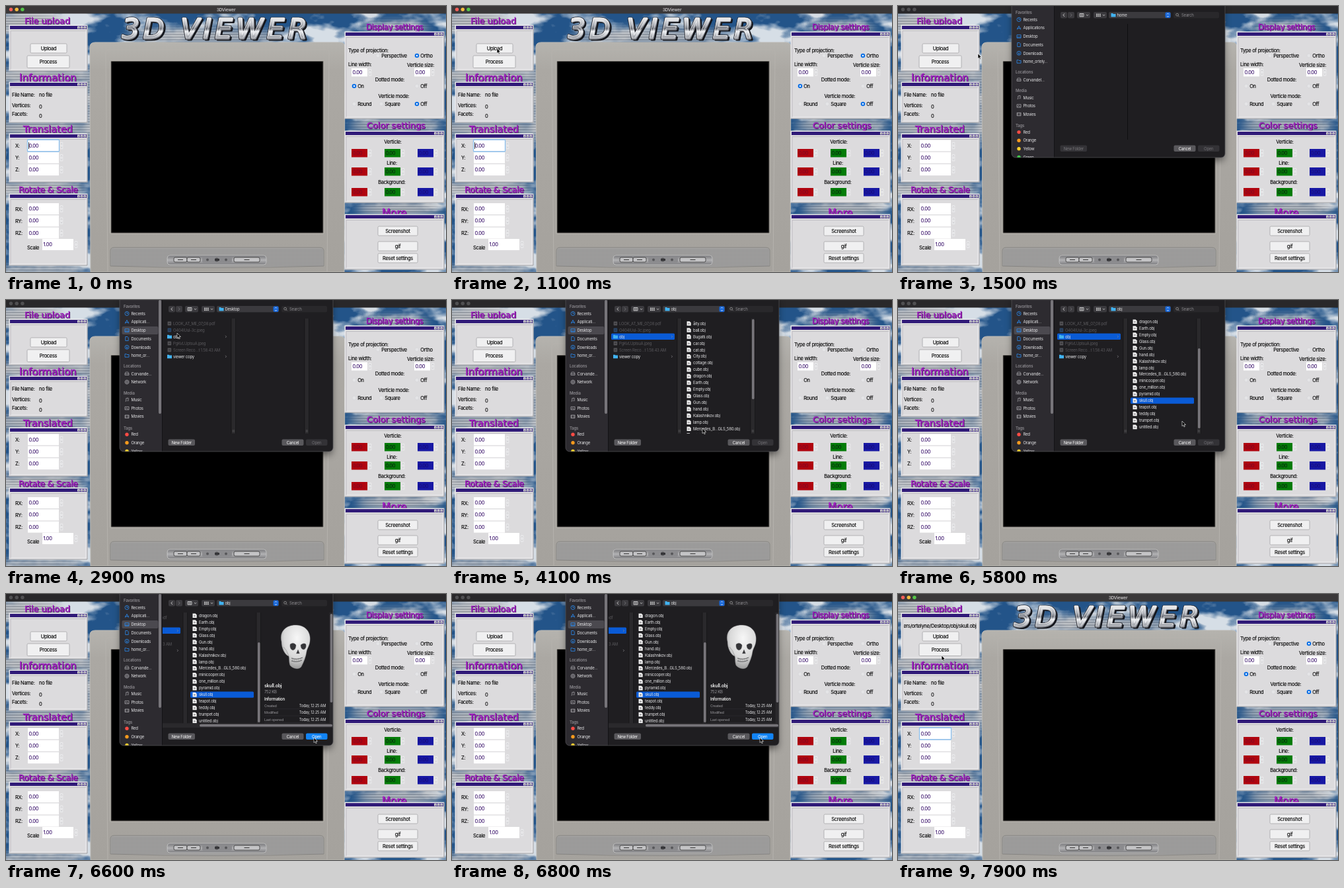
An HTML page that plays this animation: 666x402 px, repeating every 8 s.

```html
<!DOCTYPE html>
<html lang="en">
<head>
<meta charset="utf-8">
<title>3DViewer</title>
<style>
html, body { margin: 0; width: 100%; height: 100%; overflow: hidden; background: #222; }
svg { position: absolute; left: 0; top: 0; width: 666px; height: 402px; }
#back { will-change: transform; }
text { font-family: Inter, "Liberation Sans", sans-serif; white-space: pre; }
.ui { font-size: 7.5px; letter-spacing: -.3px; fill: #000; stroke: #000; stroke-width: .12px; }
.fd { font-size: 6px; letter-spacing: -.23px; fill: #e4e4e6; }
.head { font-family: "DejaVu Sans", sans-serif; fill: #b01fce; stroke: #8a18ae; stroke-width: .4px; }
.logo { font: oblique 41px "DejaVu Sans", sans-serif; letter-spacing: 6px; stroke-linejoin: round; }
</style>
</head>
<body>
<svg id="back" viewBox="0 0 666 402" xmlns="http://www.w3.org/2000/svg">
<defs>
  <filter id="soft" x="-50%" y="-50%" width="200%" height="200%"><feGaussianBlur stdDeviation="7"/></filter>
  <filter id="cloud" x="0" y="0" width="100%" height="100%" color-interpolation-filters="sRGB">
    <feTurbulence type="fractalNoise" baseFrequency=".016 .03" numOctaves="4" seed="8"/>
    <feColorMatrix values="0 0 0 0 .84  0 0 0 0 .87  0 0 0 0 .9  4.5 0 0 0 -1.95"/>
  </filter>
  <pattern id="stripes" width="8" height="4" patternUnits="userSpaceOnUse">
    <rect width="8" height="4" fill="#9a9da3"/><rect width="8" height="2" fill="#bfc1c4"/>
  </pattern>
  <mask id="haze" maskUnits="userSpaceOnUse" x="0" y="0" width="666" height="402"><g id="hazeSpots" fill="#fff" filter="url(#soft)"/></mask>
</defs>
</svg>
<svg id="stage" viewBox="0 0 666 402" xmlns="http://www.w3.org/2000/svg">
<defs>
  <filter id="shade" x="-20%" y="-20%" width="140%" height="150%"><feGaussianBlur stdDeviation="6"/></filter>
  <pattern id="grill" width="2" height="2" patternUnits="userSpaceOnUse"><rect width="1" height="1" fill="#77777a"/></pattern>
  <linearGradient id="chrome" x2="0" y2="1">
    <stop offset=".1" stop-color="#fff"/><stop offset=".38" stop-color="#a9acb3"/><stop offset=".5" stop-color="#6c6f77"/>
    <stop offset=".58" stop-color="#eef0f3"/><stop offset=".8" stop-color="#8f9299"/><stop offset="1" stop-color="#d8d9dd"/>
  </linearGradient>
  <linearGradient id="case" x2="0" y2="1">
    <stop offset="0" stop-color="#b5b3ae"/><stop offset=".12" stop-color="#aba8a3"/><stop offset="1" stop-color="#a5a29d"/>
  </linearGradient>
  <linearGradient id="strip" x2="0" y2="1"><stop offset="0" stop-color="#77777a"/><stop offset=".5" stop-color="#b2b2b4"/><stop offset="1" stop-color="#7c7c7f"/></linearGradient>
  <radialGradient id="bone" cx=".55" cy=".3" r=".75"><stop offset="0" stop-color="#f7f7f7"/><stop offset=".6" stop-color="#d9d9d9"/><stop offset="1" stop-color="#8e8e8e"/></radialGradient>
  <clipPath id="pathClip"><rect x="9" y="40" width="111" height="16"/></clipPath>
  <clipPath id="sheetClip"><path d="M172 0H495V223a6 6 0 0 1-6 6H178a6 6 0 0 1-6-6Z"/></clipPath>
  <clipPath id="colsClip"><rect x="237" y="28" width="258" height="174"/></clipPath>
  <clipPath id="listClip"><rect x="348" y="28" width="104" height="174"/></clipPath>
</defs>
</svg>
<script>
const LOOP = 8000;
const back = document.getElementById('back');
const stage = document.getElementById('stage');

function el(parent, tag, attrs = {}, content) {
  const n = document.createElementNS('http://www.w3.org/2000/svg', tag);
  for (const k in attrs) n.setAttribute(k, attrs[k]);
  if (content !== undefined) n.textContent = content;
  parent.appendChild(n);
  return n;
}
const group = (p, attrs) => el(p, 'g', attrs);
const box = (p, x, y, w, h, fill, more) => el(p, 'rect', { x, y, width: w, height: h, fill, ...more });
const disc = (p, cx, cy, r, fill, more) => el(p, 'circle', { cx, cy, r, fill, ...more });
const line = (p, d, stroke, w = .7) => el(p, 'path', { d, stroke, 'stroke-width': w, fill: 'none' });
const ui = (p, x, cy, s, more) => el(p, 'text', { class: 'ui', x, y: cy + 2.6, ...more }, s);
const fd = (p, x, cy, s, fill = '#e4e4e6', more) => el(p, 'text', { class: 'fd', x, y: cy + 2.2, style: `fill:${fill}`, ...more }, s);
const show = (n, on) => n.setAttribute('visibility', on ? 'inherit' : 'hidden');
const shift = (n, x, y) => n.setAttribute('transform', `translate(${x.toFixed(2)} ${y.toFixed(2)})`);
const MID = { 'text-anchor': 'middle' }, END = { 'text-anchor': 'end' };

// Sky, with striped haze over parts of it
box(back, 0, 0, 666, 402, '#235489');
box(back, 0, 0, 666, 402, '#fff', { filter: 'url(#cloud)' });
[[30, 25, 55, 16], [55, 106, 75, 14], [50, 185, 75, 13], [50, 275, 70, 13], [50, 400, 70, 8],
 [300, 46, 120, 11], [590, 34, 50, 9], [590, 180, 70, 11], [595, 306, 65, 11], [128, 150, 8, 60]]
  .forEach(([cx, cy, rx, ry]) => el(document.getElementById('hazeSpots'), 'ellipse', { cx, cy, rx, ry }));
box(back, 0, 11, 666, 391, 'url(#stripes)', { mask: 'url(#haze)' });

// Television
const tv = group(stage);
el(tv, 'path', { d: 'M128 402 L127 62 Q127 55 135 55 H505 Q513 55 513 62 L512 402Z', fill: 'url(#case)', stroke: '#bcbab5' });
line(tv, 'M154 402 L151 70 Q151 66 155 66 H484 Q489 66 489 70 L486 402', '#b5b2ad', 1);
box(tv, 157, 81.5, 325, 263.5, '#b3b0aa', { rx: 3 });
box(tv, 158.6, 83, 322, 260.5, '#6e6b66', { rx: 1 });
box(tv, 159.5, 84, 320, 258.5, '#000');
el(tv, 'path', { d: 'M158 393V370Q158 365 164 365H475Q481 365 481 370V393Q320 398 158 393Z', fill: '#a2a1a0', stroke: '#7d7c79', 'stroke-width': .7 });
box(tv, 160, 367, 319, 26, 'url(#grill)', { opacity: .6 });
box(tv, 244, 377, 150, 14, 'url(#strip)', { rx: 4, stroke: '#cdcdcd', 'stroke-width': .7 });
[[254, 20], [274, 20], [345, 39]].forEach(([x, w]) => {
  box(tv, x, 380, w, 7, '#c4c4c6', { rx: 2, stroke: '#333', 'stroke-width': .8 });
  line(tv, `M${x + w / 2 - 4} 383.5h8`, '#333', 1);
});
box(tv, 297, 379, 45, 9, '#8b8b8e', { rx: 2 });
[305, 319, 333].forEach((x, i) => disc(tv, x, 383.5, i === 1 ? 3 : 2, '#57575a'));
box(tv, 316, 382, 7, 3, '#353538');

// Chrome lettering
const logo = (x, y, fill, stroke, w) => el(stage, 'text', { class: 'logo', x, y, fill, stroke, 'stroke-width': w }, '3D VIEWER');
logo(178.5, 51, '#14161c', '#14161c', 3);
logo(176, 48.5, '#2a2c33', '#2a2c33', 4.6);
logo(176, 48.5, 'url(#chrome)', 'url(#chrome)', 2.8);
logo(175.3, 47.8, 'none', '#f7f7f9', .6);

// Section headings and panels
[
  ['File upload', 28, 26.5, 13, -.1], ['Information', 20, 114, 15, 0], ['Translated', 26, 190.5, 14.5, 0],
  ['Rotate & Scale', 19, 281.5, 13, -.45], ['Display settings', 545, 35.5, 11.6, -.4],
  ['Color settings', 546, 185, 13, -.08], ['More', 569, 318, 15.2, 0],
].forEach(([s, x, y, size, gap]) => {
  const style = `font-size:${size}px;letter-spacing:${gap}px`;
  el(stage, 'text', { class: 'head', x: x + 1, y: y + 1, style: style + ';fill:#4a1860;stroke:none' }, s);
  el(stage, 'text', { class: 'head', x, y, style }, s);
});

const form = group(stage);
function panel(x, y, w, h) {
  box(form, x, y, w, h, '#dcdbdd', { stroke: '#eeeef0', 'stroke-width': 1 });
  line(form, `M${x + w} ${y}V${y + h}H${x}`, '#8a888e', .8);
  box(form, x + 1, y + 1, w - 2, 5, '#301a78');
  for (let i = 0; i < 3; i++) {
    box(form, x + w - 15 + i * 4.7, y + 1.6, 3.8, 3.8, '#d8d6de');
    line(form, `M${x + w - 14 + i * 4.7} ${y + 4}h1.8`, '#222', .7);
  }
  line(form, `M${x + 2} ${y + h - 2}V${y + 8.5}H${x + w - 2}`, '#b5b3b8', .7);
  line(form, `M${x + 2} ${y + h - 2}H${x + w - 2}V${y + 8.5}`, '#f4f4f6', .7);
}
[[5, 29, 118, 69], [5, 115, 118, 61], [5, 193, 118, 73], [5, 284, 118, 108],
 [513, 39, 150, 131], [513, 189, 150, 108], [513, 315, 150, 83]].forEach(p => panel(...p));

function button(x, y, w, h, s) {
  const b = box(form, x, y, w, h, '#f0f0f1', { rx: 1.5, stroke: '#9c9ca0', 'stroke-width': .7 });
  ui(form, x + w / 2, y + h / 2, s, MID);
  return b;
}
function stepper(x, cy) {
  box(form, x, cy - 5.5, 5, 11, '#e6e6e8', { rx: 1.5 });
  line(form, `M${x + 1.3} ${cy - 2}l1.2-1.2 1.2 1.2M${x + 1.3} ${cy + 2}l1.2 1.2 1.2-1.2`, '#b4b4b8', .6);
}
function spin(x, y, w, h, s = '0.00', fill = '#fff', ink = '#38106a') {
  box(form, x, y, w, h, fill);
  ui(form, x + 1.4, y + h / 2, s, { style: `fill:${ink};stroke:${ink}` });
  stepper(x + w + 1.5, y + h / 2);
}

const upload = button(37, 57, 55, 14, 'Upload');
button(32, 75, 64, 18.5, 'Process');
button(563, 333, 60, 14, 'Screenshot');
button(563, 356, 60, 14, 'gif');
button(563, 374, 60, 14, 'Reset settings');

[['File Name:', 9, 134], ['no file', 50, 134], ['Vertices:', 9, 150.5], ['0', 50, 152.5], ['Facets:', 9, 163], ['0', 50, 166],
 ['Scale', 32, 365.5], ['Type of projection:', 518, 67], ['Line width:', 518, 88.5], ['Verticle size:', 607, 89.5]]
  .forEach(([s, x, y]) => ui(form, x, y, s));
[['Dotted mode:', 581, 111.5], ['Verticle mode:', 587, 136.5], ['Verticle:', 585.5, 205.5], ['Line:', 584, 237.5], ['Background:', 584, 266]]
  .forEach(([s, x, y]) => ui(form, x, y, s, MID));
['X', 'Y', 'Z'].forEach((s, i) => {
  ui(form, 14, 211.5 + i * 18, s + ':');
  spin(33, 202.5 + i * 18.3, 47, 17);
  ui(form, 14, 307 + i * 18, `R${s}:`);
  spin(33, 298 + i * 18.3, 47, 17);
});
spin(55, 352, 47, 17, '1.00');
spin(523, 94, 24, 12.5);
spin(618, 94, 24, 12.5);
[216, 244, 275].forEach(y => {
  spin(523, y, 24, 12.5, '0.00', '#b0040f', '#7c0a24');
  spin(573, y, 24, 12.5, '0.00', '#047c08', '#0a2410');
  spin(623, y, 24, 12.5, '0.00', '#1818a4', '#180c78');
});

// Parts that only show while the main window is active
const active = group(stage), picked = group(active);
[['Perspective', 563, 75], ['Ortho', 622, 75, 1], ['On', 527, 121, 1], ['Off', 622, 121],
 ['Round', 527, 148], ['Square', 568, 148], ['Off', 622, 148, 1]].forEach(([s, x, y, on]) => {
  disc(form, x, y, 3, '#e4e4e6', { stroke: '#cfcfd2', 'stroke-width': .5 });
  ui(form, x + 5.2, y + .2, s);
  if (on) {
    disc(picked, x, y, 3.3, '#0f72e6');
    disc(picked, x, y, 1.2, '#fff');
  }
});
box(active, 32.5, 202, 48, 18, 'none', { stroke: '#8cc0ee', 'stroke-width': 1.3, rx: 1 });
const caret = box(active, 34, 206, .8, 10, '#111');

const chosen = group(stage, { 'clip-path': 'url(#pathClip)' });
ui(chosen, 118.5, 48, '/Users/ortelyne/Desktop/obj/skull.obj', END);

// Window title bar
const bar = box(stage, 0, 0, 666, 11.5, '#3a3839');
const lights = ['#f4605a', '#f5bd40', '#55c64a'].map((c, i) => [disc(stage, 7.5 + i * 8.7, 5.3, 2.7, c), c]);
const title = ui(stage, 333, 5.4, '3DViewer', { ...MID, style: 'fill:#c0bfc0;stroke:none;font-weight:600;font-size:6.6px' });

// File sheet
const sheet = group(stage);
box(sheet, 174, 0, 319, 233, '#000', { opacity: .55, filter: 'url(#shade)' });
const pane = group(sheet, { 'clip-path': 'url(#sheetClip)' });
box(pane, 172, 0, 323, 229, '#1f1e21');
box(pane, 172, 0, 64.5, 229, '#2d2b30');
line(pane, 'M236.5 0V229', '#101012', .8);

const icons = {
  clock: 'M-3 0a3 3 0 1 0 6 0a3 3 0 1 0-6 0M0-2V0H1.6',
  app: 'M-2.6 2.6L0-2.8L2.6 2.6M-3 .9H3',
  desk: 'M-3-2.3H3V2.3H-3ZM-3 1H3',
  doc: 'M-2.2-3H1L2.2-1.6V3H-2.2Z',
  down: 'M-3 0a3 3 0 1 0 6 0a3 3 0 1 0-6 0M0-1.7V1.6M-1.3.4L0 1.7L1.3.4',
  folder: 'M-3-2.3H-.6L0-1.5H3V2.3H-3Z',
  disk: 'M-3 .2L-2-2.2H2L3 .2V2.2H-3ZM-3 .2H3',
  net: 'M-3 0a3 3 0 1 0 6 0a3 3 0 1 0-6 0M-3 0H3M0-3V3',
  note: 'M-1.2 2V-2.4L2-3V1.4M-2.4 2h1.2M.8 1.4H2',
  photo: 'M-3-2.2H3V2.2H-3ZM-2.4 1.5L-.6-.5L2.2 1.7',
  film: 'M-3-2.2H3V2.2H-3ZM-1.6-2.2V2.2M1.6-2.2V2.2',
};
function sidebar(wide) {
  const g = group(pane);
  const row = (cy, s, icon, color = '#2a8cf2') => {
    const at = group(g, { transform: `translate(183 ${cy})` });
    icon ? line(at, icons[icon], color, .8) : disc(at, 0, 0, 2.7, color);
    fd(g, 189.5, cy, s);
  };
  const label = (cy, s) => fd(g, 178, cy, s, '#8a888d', { 'font-weight': 600 });
  const dy = wide ? 0 : 12.6, gray = '#a4a3a8';
  if (!wide) box(g, 175.5, 40, 55, 12, '#4b494f', { rx: 2 });
  label(10, 'Favorites');
  row(20.5, 'Recents', 'clock');
  row(33, wide ? 'Applications' : 'Applicati…', 'app');
  row(46, 'Desktop', 'desk');
  row(58.5, 'Documents', 'doc');
  row(71.3, 'Downloads', 'down');
  row(84, wide ? 'home_ortely…' : 'home_or…', 'folder');
  label(100, 'Locations');
  row(111.3, wide ? 'Corvandel…' : 'Corvande…', 'disk', gray);
  if (!wide) row(124, 'Network', 'net', gray);
  label(128 + dy, 'Media');
  row(138.4 + dy, 'Music', 'note', gray);
  row(151 + dy, 'Photos', 'photo', gray);
  row(163.6 + dy, 'Movies', 'film', gray);
  label(180.7 + dy, 'Tags');
  [['Red', '#fb4b44'], ['Orange', '#f79a1d'], ['Yellow', '#f9cf2c'], ['Green', '#40cd4c']]
    .forEach(([s, c], i) => row(190.6 + dy + i * 12.6, s, null, c));
  if (!wide) box(g, 231, 0, 4, 172, '#77757a', { rx: 2 });
  return g;
}
const sideHome = sidebar(true), sideDesk = sidebar(false);

// Toolbar
const folder = (p, x, cy) => el(p, 'path', { d: `M${x} ${cy - 2.7}h2.6l.8.9h3.6v4.6h-7Z`, fill: '#41b2f0' });
[[246, 10], [257, 10], [271, 20], [296, 20], [319, 94], [417, 69]].forEach(([x, w], i) =>
  box(pane, x, 9, w, 9.5, i === 5 ? '#29282b' : '#3b3a3e', { rx: 2 }));
line(pane, 'M252 11.5l-2 2.2 2 2.2', '#ddd', .9);
line(pane, 'M261 11.5l2 2.2-2 2.2', '#77767a', .9);
line(pane, 'M275 11.5h6v4.5h-6zM277 11.5v4.5M279 11.5v4.5M285 13l1.6 1.6 1.6-1.6M310 13l1.6 1.6 1.6-1.6', '#ddd', .8);
for (let i = 0; i < 6; i++) box(pane, 300 + i % 3 * 2.5, 11.7 + (i > 2) * 2.6, 1.6, 1.8, '#ddd');
folder(pane, 322.5, 13.7);
box(pane, 404.5, 9.5, 8, 8.5, '#1766d8', { rx: 2 });
line(pane, 'M407 12.6l1.5-1.5 1.5 1.5M407 15l1.5 1.5 1.5-1.5', '#fff', .8);
const place = fd(pane, 331.5, 13.8, 'home');
disc(pane, 422.6, 13.2, 1.9, 'none', { stroke: '#aaa', 'stroke-width': .7 });
line(pane, 'M424 14.6l1.6 1.6', '#aaa');
fd(pane, 429, 13.8, 'Search', '#8c8b8f');

// Columns
const homeCol = line(pane, 'M347.5 27V202', '#0e0e10', 1);
const view = group(pane, { 'clip-path': 'url(#colsClip)' });
const cols = group(view);
[341, 452].forEach(x => {
  box(cols, x, 27, 6.5, 176, '#2a292c', { stroke: '#111113', 'stroke-width': .6 });
  line(cols, `M${x + 2.4} 196v4M${x + 4.2} 196v4`, '#68676b', .6);
});
const objMark = box(cols, 241, 50.6, 96, 9.4, '#0a5bd6', { rx: 1.5 });
[['LOOK_AT_ME_07_08.pdf'], ['O404lUuI-3c.jpeg'], ['obj', 1], ['PgKvLUptsuA.jpeg'], ['Screen Reco…t 1.58.43 AM'], ['viewer copy', 1]]
  .forEach(([s, isDir], i) => {
    const cy = 35.4 + i * 10;
    if (isDir) {
      folder(cols, 244, cy);
      line(cols, `M332 ${cy - 1.6}l1.6 1.6-1.6 1.6`, '#8b8a8e');
    } else {
      box(cols, 244.6, cy - 3, 5.6, 6, i === 1 ? '#2b4566' : '#515054', { rx: .6 });
      line(cols, `M246 ${cy}h3`, '#222', .7);
    }
    fd(cols, 253, cy, s, isDir ? '#e9e9eb' : '#59585c');
  });

const ROW = 9.95, SCROLL = 82.4;
const objCol = group(cols, { 'clip-path': 'url(#listClip)' });
const list = group(objCol);
const files = 'âity ball Bugatti car cat City cottage cube dragon Earth Empty Glass Gun hand Kalashnikov lamp Mercedes_B…GLS_580 minicooper one_million pyramid skull teapot teddy trumpet untitled'.split(' ');
const skullMark = box(list, 352, 35.5 + 20 * ROW - 4.7, 96, 9.4, '#0a5bd6', { rx: 1.5 });
files.forEach((s, i) => {
  const cy = 35.5 + i * ROW;
  el(list, 'path', { d: `M355.5 ${cy - 3.3}h4.2l2 2v4.6h-6.2Z`, fill: '#f0f0f0' });
  line(list, `M356.8 ${cy + .4}h3.4M358.4 ${cy - 1}v2.8`, '#77767a', .7);
  fd(list, 365, cy, s + '.obj');
});
const thumb = box(cols, 454, 29, 3.6, 121, '#77757a', { rx: 1.8 });

// Preview column
const info = group(cols, { transform: 'translate(73 0)' });
box(info, 386.5, 28, 109, 175, '#1f1e21');
const skull = group(info, { stroke: '#77777a', 'stroke-width': .4 });
el(skull, 'path', { fill: 'url(#bone)', d: 'M417 72C413 55 426 46 440 47C455 48 462 59 460 72C459 79 456 82 455 87C454 95 451 102 447 110C443 115 434 113 430 108C428 103 429 98 428 94C422 92 417 82 417 72Z' });
el(skull, 'path', { fill: '#343437', d: 'M430 76q5-4 9 1q0 7-5 8q-5-2-4-9ZM446 77q5-4 8-1q1 6-3 8q-5 0-5-7ZM442 84l2.4 6h-5Z' });
line(skull, 'M432 97q8 3 17-1M432 101q8 3 16-1', '#4d4d50', .9);
line(skull, 'M434 96.5v5M437 97.5v5M440 98v5M443 98v5M446 97v5M420 80q5 4 8 14', '#8a8a8c', .6);
fd(info, 391, 139, 'skull.obj', '#eee', { style: 'fill:#eee;font-weight:600;font-size:7px' });
fd(info, 391, 148, '752 KB', '#98979b');
fd(info, 391, 158.7, 'Information', '#eee', { 'font-weight': 600 });
['Created', 'Modified', 'Last opened'].forEach((s, i) => {
  const cy = 168.7 + i * 10.4;
  fd(info, 391, cy, s, '#98979b', { style: 'fill:#98979b;font-size:5.4px' });
  fd(info, 484, cy, 'Today, 12:25 AM', '', { ...END, style: 'fill:#e4e4e6;font-size:5.6px' });
  line(info, `M391 ${cy + 5}H484`, '#333236', .5);
});
box(info, 489.5, 28, 6, 168, '#2a292c');
box(info, 490.7, 30, 3.6, 134, '#77757a', { rx: 1.8 });
const rail = group(view);
box(rail, 237, 195.3, 258, 7, '#2a292c');
box(rail, 293, 196.8, 201, 3.8, '#77757a', { rx: 1.9 });

// Bottom buttons
function sheetButton(x, w, s) {
  const face = box(pane, x, 210.5, w, 9.6, '#59585c', { rx: 2 });
  const label = fd(pane, x + w / 2, 215.4, s, '#fff', MID);
  return (fill, ink) => { face.setAttribute('fill', fill); label.style.fill = ink; };
}
const newFolder = sheetButton(245.5, 40.5, 'New Folder');
sheetButton(417.5, 33, 'Cancel');
const open = sheetButton(454, 32.5, 'Open');
el(sheet, 'path', { d: 'M172 0V223a6 6 0 0 0 6 6H489a6 6 0 0 0 6-6V0', fill: 'none', stroke: '#58575b', 'stroke-width': .7 });

const cursor = group(stage);
el(cursor, 'path', { d: 'M0 0V7.6L1.8 6L3 8.8L4.3 8.2L3.1 5.5H5.5Z', fill: '#000', stroke: '#fff', 'stroke-width': .6 });

// Motion: [time, x, y]
const pointer = [
  [100, 200, 403], [900, 68, 64], [1300, 68, 64], [1500, 121, 72], [2000, 200, 46], [2300, 200, 46],
  [2800, 259, 50], [3400, 259, 50], [4100, 379, 194], [4300, 379, 194], [5000, 379.5, 158], [5200, 379.5, 158],
  [5500, 379.5, 153], [5600, 379.5, 153], [5800, 430, 183], [6000, 436, 188], [6500, 466, 217], [6900, 466, 217],
  [7400, 318, 216], [7500, 318, 216], [7900, 66, 93],
];
const ease = (t, a, b) => {
  const p = Math.min(1, Math.max(0, (t - a) / (b - a)));
  return p * p * (3 - 2 * p);
};
function follow(path, t) {
  let i = 0;
  while (i < path.length - 2 && t >= path[i + 1][0]) i++;
  const [a, x0, y0] = path[i], [b, x1, y1] = path[i + 1], p = ease(t, a, b);
  return [x0 + (x1 - x0) * p, y0 + (y1 - y0) * p];
}

const OPENED = 1300, DESKTOP = 2200, FOLDER = 3300, PICKED = 5700, CLOSED = 7000;

function draw(t) {
  const modal = t >= OPENED && t < CLOSED;
  show(sheet, modal);
  show(active, !modal);
  show(title, !modal);
  show(caret, !modal && t % 1000 < 500);
  show(chosen, t >= CLOSED);
  bar.setAttribute('fill', modal ? '#29282a' : '#3a3839');
  lights.forEach(([n, c]) => n.setAttribute('fill', modal ? '#505052' : c));
  upload.setAttribute('fill', t >= 1000 && t < 1100 ? '#d2d2d6' : '#f0f0f1');

  const desk = t >= DESKTOP, inObj = t >= FOLDER;
  show(sideHome, !desk);
  show(sideDesk, desk);
  show(homeCol, !desk);
  show(view, desk);
  place.textContent = inObj ? 'obj' : desk ? 'Desktop' : 'home';
  newFolder(desk ? '#59585c' : '#343337', desk ? '#fff' : '#78777b');
  [objMark, objCol, thumb].forEach(n => show(n, inObj));

  const scroll = ease(t, 4350, 5200), slide = ease(t, 5850, 6200);
  shift(list, 0, -SCROLL * scroll);
  shift(thumb, 0, 44 * scroll);
  show(skullMark, t >= PICKED);
  shift(cols, -73 * slide, 0);
  show(info, slide > 0);
  show(rail, slide > 0);
  open(slide > 0 ? '#1284f5' : '#333236', slide > 0 ? '#fff' : '#717074');

  show(cursor, t >= 100);
  shift(cursor, ...follow(pointer, t));
}

const start = performance.now();
function tick() {
  draw((performance.now() - start) % LOOP);
  requestAnimationFrame(tick);
}
tick();
</script>
</body>
</html>
```
